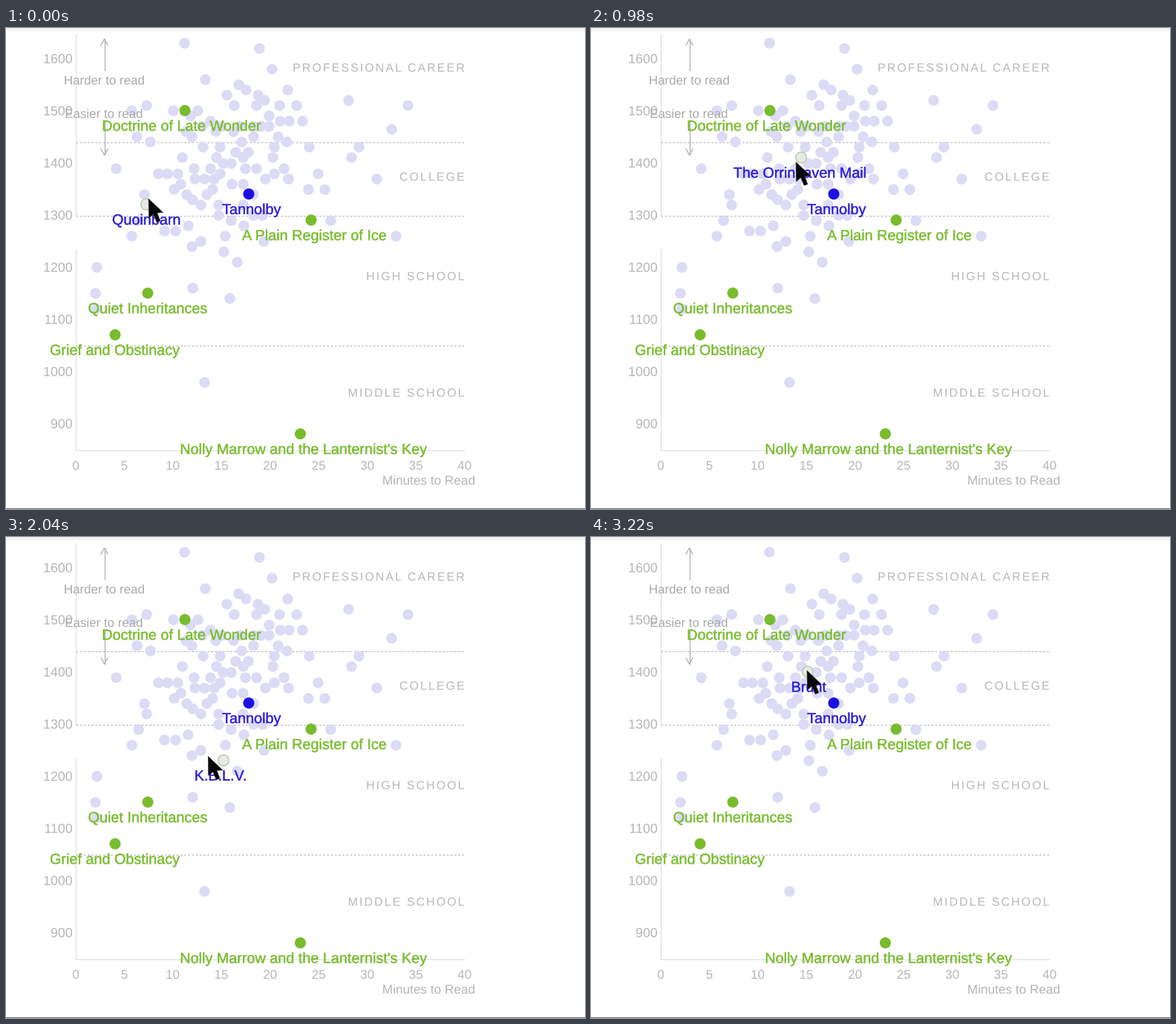
A matplotlib script for the animation above (3240 ms loop, 780 by 648 pixels).

```python
import numpy as np
import matplotlib.pyplot as plt
from matplotlib.animation import FuncAnimation
from matplotlib.patches import Circle, PathPatch, Polygon
from matplotlib.path import Path
from matplotlib.textpath import TextPath

W, H, DPI = 780, 648, 100
STEP, FRAMES = 20, 162
PX = 72 / DPI  # points per pixel

GREEN, BLUE, BLUE_TEXT = "#78bc2d", "#1c10e4", "#2a1cd8"
PALE, GREY, TICK = "#dbdbf6", "#b0b0b0", "#b6b6b6"
FONT = {"family": "Liberation Sans"}

fig = plt.figure(figsize=(W / DPI, H / DPI), dpi=DPI, facecolor="white")
ax = fig.add_axes([0, 0, 1, 1])
ax.set_xlim(0, W)
ax.set_ylim(H, 0)
ax.axis("off")


def advance(s, size):
    """Pen position after s."""
    end = TextPath((0, 0), s + "I", size=size, prop=FONT).get_extents().x1
    return end - TextPath((0, 0), "I", size=size, prop=FONT).get_extents().x1


def glyphs(s, size, gap=0):
    if not gap:
        return TextPath((0, 0), s, size=size, prop=FONT)
    parts = [TextPath((advance(s[:i], size) + i * gap, 0), c, size=size, prop=FONT)
             for i, c in enumerate(s) if c != " "]
    return Path.make_compound_path(*parts)


def text(s, x, cy, size, color, align=0.5, gap=0, weight=0, z=4):
    """Text centred vertically on cy; align 0 left, 0.5 middle, 1 right."""
    path = glyphs(s, size, gap)
    box = path.get_extents()
    left = x - box.x0 - align * box.width
    verts = path.vertices * [1, -1] + [left, cy + 0.36 * size]
    patch = PathPatch(Path(verts, path.codes), facecolor=color, edgecolor=color,
                      linewidth=weight * PX, zorder=z)
    return ax.add_patch(patch)


def line(xs, ys, color, width=1, z=1, **kw):
    ax.plot(xs, ys, color=color, lw=width * PX, zorder=z, **kw)


def label(s, x, dot_y, color, z=5):
    return text(s, x, dot_y + 20, 19.8, color, weight=0.45, z=z)


def score_y(score):
    return 41 + (1600 - score) * 0.7025


def minute_x(m):
    return 94 + m * 13.09


# Window edges
for i in range(6):
    ax.axhspan(i, i + 1, color=str(0.93 + 0.012 * i), lw=0, zorder=0)
line([0, W], [646.5, 646.5], "#707070")

# Axes, bands and ticks
line([94, 94], [8, 252], "#dcdcdc")
line([94, 94], [298, 568], "#dcdcdc")
line([94, 617], [568.5, 568.5], "#dcdcdc")
for score in (1440, 1300, 1050):
    y = round(score_y(score)) + 0.5
    line([94, 617], [y, y], "#b0b0b0", dashes=(2.6, 2.6), dash_capstyle="butt")
for score in range(900, 1601, 100):
    text(str(score), 89, score_y(score), 17.8, TICK, align=1)
for m in range(0, 41, 5):
    text(str(m), minute_x(m), 589, 17, TICK)
text("Minutes to Read", 631, 609, 17.2, TICK, align=1)
for name, y in (("PROFESSIONAL CAREER", 53), ("COLLEGE", 200),
                ("HIGH SCHOOL", 334), ("MIDDLE SCHOOL", 491)):
    text(name, 617, y, 15.9, "#b8b8b8", align=1, gap=2.1)

# Difficulty arrows
for tail, tip, back in ((57, 15, 8), (126, 171, -8)):
    line([132.5, 132.5], [tail, tip], GREY, 1.3)
    line([128, 132.5, 137], [tip + back, tip, tip + back], GREY, 1.3)
text("Harder to read", 132.5, 70, 16.9, "#aaaaaa")
text("Easier to read", 132, 115, 16.9, "#aaaaaa")

# Pinned dots: x, score, label shift, name
BOOKS = [
    (241, 1500, -4, "Doctrine of Late Wonder"),
    (411, 1290, 4, "A Plain Register of Ice"),
    (191, 1150, 0, "Quiet Inheritances"),
    (147, 1070, 0, "Grief and Obstinacy"),
    (396.5, 880, 5, "Nolly Marrow and the Lanternist's Key"),
]
PINNED = [(*book, GREEN, GREEN) for book in BOOKS]
PINNED.append((327, 1340, 4, "Tannolby", BLUE, BLUE_TEXT))
for x, score, shift, name, fill, ink in PINNED:
    y = score_y(score)
    ax.add_patch(Circle((x, y), 7.5, fc=fill, lw=0, zorder=3))
    label(name, x + shift, y, ink)

# Dots that answer to the pointer: x, score, label shift, name
HOVER = [
    (189, 1320, 0, "Quoinbarn"),
    (251, 1330, 5, "Tolbrook Advance"),
    (283, 1410, -2, "The Orrinhaven Mail"),
    (293, 1230, -4, "K.B.L.V."),
    (250, 1240, -8, "Oldmere Net Systems"),
    (213, 1270, -10, "LVRb"),
    (292, 1400, 2, "Brunt"),
]
spots = np.array([(x, score_y(score)) for x, score, _, _ in HOVER])
tips = [label(name, x + shift, score_y(score), BLUE_TEXT, z=6)
        for x, score, shift, name in HOVER]
ring = ax.add_patch(Circle((0, 0), 7.3, fc="#e6e9e5", ec="#b8d0a0",
                           lw=1.5 * PX, zorder=3))

# Outlying dots; the rest form a tilted cloud of rounded scores
OUTLIERS = [
    (240, 1630), (341, 1620), (358, 1580), (268, 1560), (461, 1520),
    (541, 1510), (519, 1465), (475, 1430), (465, 1410), (499, 1370),
    (525, 1260), (437, 1290), (148, 1390), (122, 1200), (120, 1150),
    (121, 1120), (251, 1160), (301, 1140), (311, 1210), (267, 980),
]


def cloud(count, taken, rng):
    """Add random dots that keep a small distance from each other."""
    dots = list(taken)
    while len(dots) < len(taken) + count:
        a, b = rng.normal(size=2)
        x = 290 + 72 * a
        score = round(1395 + 25 * a + 72 * b, -1)
        y = score_y(score)
        inside = 165 < x < 442 and 1230 < score < 1560
        if inside and min(np.hypot(x - u, y - v) for u, v in dots) > 10:
            dots.append((x, y))
    return dots


fixed = [(x, score_y(score)) for x, score in OUTLIERS] + [tuple(s) for s in spots]
dots = cloud(88, fixed, np.random.default_rng(12))
ax.scatter(*zip(*dots), s=(14.4 * PX) ** 2, c=PALE, linewidths=0, zorder=2)

# Pointer path: time in ms, x, y
KEYS = np.array([
    (0, 192, 230), (560, 246, 229), (740, 249, 207), (1040, 280, 177),
    (1240, 267, 187), (1660, 289, 295), (2420, 244, 278), (2780, 199, 276),
    (3220, 291, 180),
], float)
TIMES, POINTS = KEYS[:, 0], KEYS[:, 1:]
SLOPES = np.zeros_like(POINTS)
SLOPES[1:-1] = (POINTS[2:] - POINTS[:-2]) / (TIMES[2:] - TIMES[:-2])[:, None]

ARROW = 0.93 * np.array([(0, 0), (0.5, 28), (7, 22.5), (12, 34), (17, 32),
                         (12.5, 20.5), (21, 20)])
cursor = ax.add_patch(Polygon(ARROW, closed=True, fc="#080808", ec="#30303a",
                              lw=0.6 * PX, zorder=8))


def pointer(t):
    """Hermite curve through the path points."""
    i = min(np.searchsorted(TIMES, t, side="right") - 1, len(TIMES) - 2)
    d = TIMES[i + 1] - TIMES[i]
    u = min((t - TIMES[i]) / d, 1)
    return ((1 + 2 * u) * (1 - u) ** 2 * POINTS[i]
            + u * (1 - u) ** 2 * d * SLOPES[i]
            + u * u * (3 - 2 * u) * POINTS[i + 1]
            + u * u * (u - 1) * d * SLOPES[i + 1])


def update(frame):
    pos = pointer(frame * STEP)
    near = np.argmin(np.hypot(*(spots - pos).T))
    for i, tip in enumerate(tips):
        tip.set_visible(i == near)
    ring.center = spots[near]
    cursor.set_xy(ARROW + pos)
    return [ring, cursor, *tips]


anim = FuncAnimation(fig, update, frames=FRAMES, interval=STEP, repeat=True,
                     repeat_delay=0, blit=False)
plt.show()
```
